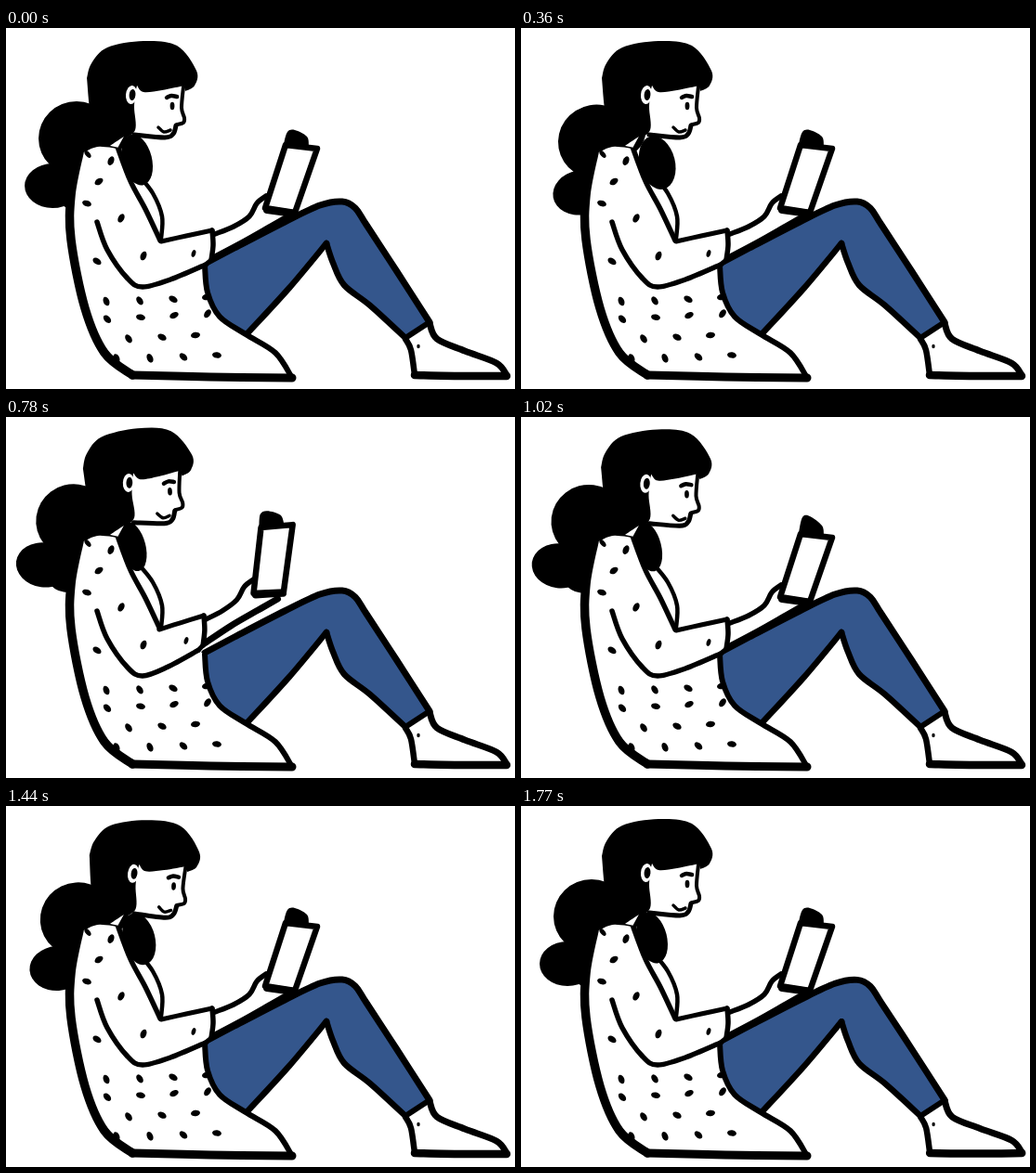
Recreate the animation shown at these times as an HTML page with a canvas. Size 548 by 389 pixels, loop 1800 ms.

```html
<!DOCTYPE html>
<html lang="en">
<head>
<meta charset="utf-8">
<title>Reading</title>
<style>
html, body { margin: 0; width: 100%; height: 100%; overflow: hidden; background: #fff; }
canvas { display: block; }
</style>
</head>
<body>
<canvas id="stage" width="548" height="389"></canvas>
<script>
const ctx = document.getElementById('stage').getContext('2d');
const LOOP = 1800, INK = '#000', PAPER = '#fff', DENIM = '#34568c';

const pts = s => s.split(' ').map(p => p.split(',').map(Number));
const clamp = (v, lo, hi) => Math.max(lo, Math.min(hi, v));
const back = p => p.slice().reverse();

// Smooth path through points (Catmull-Rom as Beziers).
function trace(p, join) {
  const at = i => p[clamp(i, 0, p.length - 1)];
  if (join) ctx.lineTo(...p[0]); else ctx.moveTo(...p[0]);
  for (let i = 0; i < p.length - 1; i++) {
    const [a, b, c, d] = [at(i - 1), at(i), at(i + 1), at(i + 2)];
    ctx.bezierCurveTo(b[0] + (c[0] - a[0]) / 6, b[1] + (c[1] - a[1]) / 6,
      c[0] - (d[0] - b[0]) / 6, c[1] - (d[1] - b[1]) / 6, c[0], c[1]);
  }
}
function line(p, w) {
  ctx.beginPath();
  trace(p);
  ctx.lineWidth = w;
  ctx.stroke();
}
// Fill bounded by smooth sides that meet at corners.
function area(color, ...sides) {
  ctx.beginPath();
  sides.forEach((s, i) => trace(s, i > 0));
  ctx.closePath();
  ctx.fillStyle = color;
  ctx.fill();
}
function oval(x, y, rx, ry, tilt = 0, color = INK) {
  ctx.beginPath();
  ctx.ellipse(x, y, rx, ry, tilt, 0, 7);
  ctx.fillStyle = color;
  ctx.fill();
}
function turned(x, y, angle, draw) {
  ctx.save();
  ctx.translate(x, y);
  ctx.rotate(angle);
  draw();
  ctx.restore();
}

// Looping cosine ease between [time, value] keys.
const ease = (...keys) => t => {
  const next = keys.findIndex(k => k[0] > t);
  const i = next < 0 ? 0 : next;
  const [t1, v1] = keys[i], [t0, v0] = keys[(i + keys.length - 1) % keys.length];
  const span = (t1 - t0 + LOOP) % LOOP, u = ((t - t0 + LOOP) % LOOP) / span;
  return v0 + (v1 - v0) * (1 - Math.cos(Math.PI * u)) / 2;
};
const nod = ease([180, .04], [620, -.07], [1400, .04], [1785, 0]);
const swing = ease([180, -4], [540, -16], [840, 10], [1420, -4], [1785, 0]);
const pull = ease([380, 0], [700, 1], [800, 1], [990, 0]);
const flip = ease([860, 0], [1020, 1], [1110, 0]);
// Toes tap every 360 ms, with a pause in the middle of the loop.
const tap = t => t > 360 && t < 1080 ? 0 : Math.sin(Math.PI * t / 360) ** 2;

const coat = {
  back: pts('79,134 70,180 70,228 85,302 106,350 136,374'),
  hem: pts('136,374 220,376 308,377'),
  edge: pts('308,377 290,350 258,330 230,311 217,285 214,256'),
  lapel: pts('120,128 134,165 150,195 166,229'),
  collar: pts('120,128 98,126 79,134')
};

// A tap lowers the knee, nudges the shin and raises the toes.
const tapped = (p, k) => p.map(([x, y]) => [
  x + 3 * k * clamp((x - 300) / 130, 0, 1),
  y + k * (6 * Math.exp(-(((x - 365) / 50) ** 2)) - 15 * Math.max(0, (x - 456) / 84))
]);
// Pulling the book moves the arm more the farther it is from the elbow.
const reached = (p, a) => p.map(([x, y]) => {
  const s = a * clamp((x - 150) / 72, 0, 1.5);
  return [x - 9 * s, y - 4 * s];
});

function drawLeg(k) {
  const part = s => tapped(pts(s), k);
  const top = part('214,254 246,237 300,209 338,191 362,187 376,194 388,212 420,261 456,317');
  const under = part('430,334 392,299 364,277 352,253 345,232');
  const thigh = part('345,232 305,280 260,329');
  const heel = part('430,335 436,347 440,374');
  const sole = part('440,374 490,375 539,375');
  const instep = part('456,318 464,335 494,348 528,361 539,374');
  area(PAPER, heel, sole, back(instep));
  line(heel, 6.5);
  line(sole, 8.5);
  line(instep, 7);
  oval(444 + 2 * k, 343 - k, 1.7, 2.2);
  area(DENIM, top, under, thigh, coat.edge.slice(2));
  line(top, 7);
  line(under, 6.5);
  line(thigh, 6.5);
  line([top[8], under[0]], 6);
}

function drawBun(turn) {
  const lift = .75 * Math.min(0, turn + 4);
  turned(125, 95 + lift, turn * Math.PI / 180, () => {
    ctx.translate(-125, -95);
    oval(76, 119, 41, 40);
    oval(50, 170, 30, 24);
    oval(103, 112, 28, 28);
    oval(75, 168, 25, 28);
  });
}

function drawCoat(turn) {
  line(pts('143,159 158,178 168,203 167,227'), 4.5);
  const k = -turn / 16;
  oval(141 + 9 * k, 142 + 5 * k, 16 + 5 * k, 28 + 2 * k, -.25);
  area(PAPER, coat.back, coat.hem, coat.edge, back(coat.lapel), coat.collar);
  line(coat.back, 9.5);
  line(coat.hem, 9);
  line(coat.edge, 6);
  line(coat.lapel, 5.5);
  line(coat.collar, 4);
  oval(88, 136, 2.5, 4.5, -.7);
}

// Slanting rows of flecks, kept clear of the outlines and the sleeve.
function drawFlecks(a) {
  for (let r = 0; r < 11; r++) {
    const y = 147 + 20.5 * r, low = y > 270;
    const left = 82 + Math.max(0, y - 250) * .35;
    const right = low ? 200 + (y - 260) * .55 : 110 + (y - 128) * .4;
    const seam = 98 + (y - 209) * .67;
    const gap = low ? 36 : 50;
    for (let x = 63 + (50 - 13 * r % 50); x < right; x += gap) {
      const wob = Math.sin(x * 12.9 + y * 7.3);
      const onSeam = y > 200 && y < 285 && Math.abs(x - seam) < 9;
      if (x > left && !onSeam) oval(x, y + 4 * wob, 5, 3.2, 1.2 * wob);
    }
  }
  oval(202 - 8 * a, 243 - 2 * a, 2.2, 4, .3);
}

function drawArm(a) {
  const part = s => reached(pts(s), a);
  const top = part('225,222 245,214 262,203 270,189 280,181');
  const low = part('221,249 255,231 285,214 306,202');
  const cuff = part('222,218 223,234 221,250');
  const upper = part('167,230 194,224 222,218');
  const under = part('98,209 109,239 131,270 147,279 177,271 215,255');
  area(PAPER, top, back(low));
  line(low, 7);
  line(top, 5.5);
  area(PAPER, upper, cuff, back(under.slice(3)));
  line(upper, 5);
  line(under, 5.5);
  line([under[5], cuff[2]], 5);
  line(cuff, 5.5);
}

function drawBook(a, page) {
  turned(307 - 19 * a, 164 - 9 * a, -.2 * a, () => {
    ctx.beginPath();
    ctx.moveTo(-6, -38);
    ctx.lineTo(28, -34);
    ctx.lineTo(4, 35);
    ctx.lineTo(-28, 30);
    ctx.closePath();
    ctx.fillStyle = PAPER;
    ctx.fill();
    ctx.lineWidth = 6.5;
    ctx.stroke();
    line([[-26, 32], [3, 36]], 8);
    area(INK, [[-8, -39], [-4, -52 - 4 * page], [4, -54 - 3 * page], [17, -47], [19, -37]]);
  });
}

function drawHead(angle, blink) {
  turned(115, 125, angle, () => {
    ctx.translate(-115, -125);
    const bangs = pts('192,62 168,67 148,69 141,62');
    area(PAPER, bangs, pts('138,115 171,118 183,107 191,101 190,64'));
    line(pts('191,63 189,86 192,97 191,102 184,104'), 4);
    line(pts('183,105 180,114 171,118 138,115'), 5);
    area(INK, pts('87,54 92,38 109,21 148,14 184,19 205,46 203,62 193,68'), bangs,
      pts('140,66 138,85 139,110 124,120 105,124'), pts('105,124 92,98 87,54'));
    oval(135, 72, 6, 10, .1, PAPER);
    oval(136, 72, 3.4, 6, .1);
    line(pts('173,75 178,73 184,74'), 4.5);
    if (blink) line(pts('175,85 179,87 184,86'), 3.5);
    else oval(179, 84, 2.4, 4.2);
    line(pts('164,107 170,112 177,110'), 3.5);
  });
}

function drawNeck() {
  area(PAPER, [[112, 127], [128, 117], [122, 129]]);
  line([[128, 118], [122, 129]], 3);
}

function render(t) {
  ctx.fillStyle = PAPER;
  ctx.fillRect(0, 0, 548, 389);
  ctx.strokeStyle = INK;
  ctx.lineCap = ctx.lineJoin = 'round';
  const a = pull(t), turn = swing(t);
  drawLeg(tap(t));
  drawBun(turn);
  drawCoat(turn);
  drawArm(a);
  drawFlecks(a);
  drawBook(a, flip(t));
  drawHead(nod(t), t >= 120 && t < 250);
  drawNeck();
}

const start = performance.now();
function frame(now) {
  render(Math.max(0, now - start) % LOOP);
  requestAnimationFrame(frame);
}
render(0);
requestAnimationFrame(frame);
</script>
</body>
</html>
```
